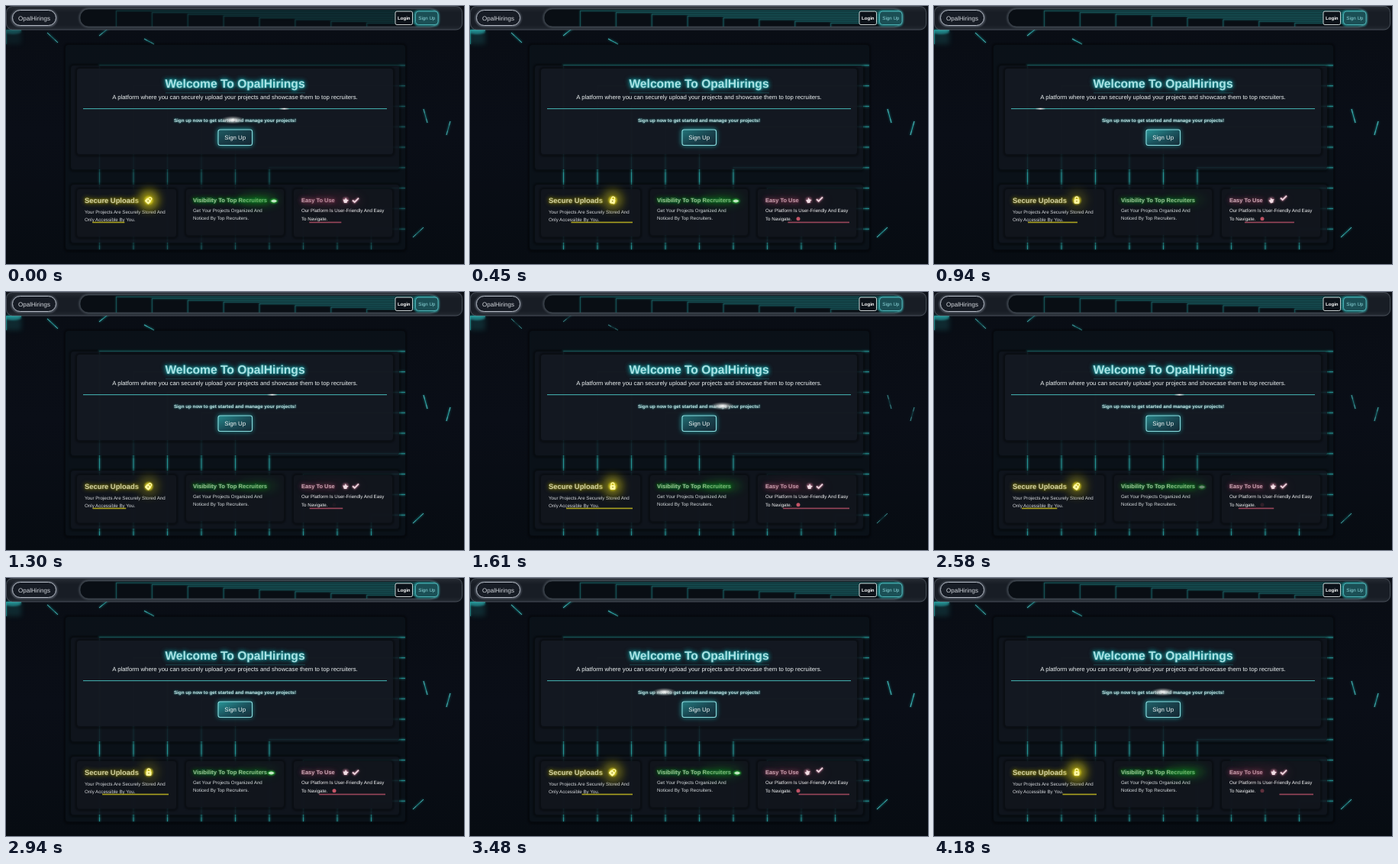
These frames come from a looping animation (600 px wide and 338 px high, 4210 ms). An HTML page:

```html
<!DOCTYPE html>
<html lang="en">
<head>
<meta charset="utf-8">
<title>OpalHirings</title>
<style>
html, body { margin: 0; width: 100%; height: 100%; overflow: hidden; background: #080c13; }
svg { display: block; width: 100vw; height: 100vh; font-family: "Liberation Sans", Arial, sans-serif; text-rendering: geometricPrecision; }
.bold { font-weight: 700; }
</style>
</head>
<body>
<svg id="stage" viewBox="0 0 600 338" preserveAspectRatio="none">
  <defs>
    <linearGradient id="page" x1="0" y1="0" x2="0" y2="1">
      <stop offset="0" stop-color="#090d14"/><stop offset=".5" stop-color="#0a0e17"/><stop offset="1" stop-color="#070c12"/>
    </linearGradient>
    <linearGradient id="navFill" x1="0" y1="0" x2="0" y2="1">
      <stop offset="0" stop-color="#262b33"/><stop offset=".25" stop-color="#181d25"/>
      <stop offset=".8" stop-color="#181d25"/><stop offset="1" stop-color="#242a32"/>
    </linearGradient>
    <linearGradient id="buttonFill" x1="0" y1="0" x2="1" y2="1">
      <stop offset="0" stop-color="#2a9a9c"/><stop offset=".5" stop-color="#1b5660"/><stop offset="1" stop-color="#162d39"/>
    </linearGradient>
    <radialGradient id="flare">
      <stop offset="0" stop-color="#fff"/><stop offset=".3" stop-color="#ddd" stop-opacity=".8"/>
      <stop offset="1" stop-color="#888" stop-opacity="0"/>
    </radialGradient>
    <linearGradient id="beam">
      <stop offset="0" stop-color="#fff" stop-opacity="0"/><stop offset=".5" stop-color="#fff"/>
      <stop offset="1" stop-color="#fff" stop-opacity="0"/>
    </linearGradient>
    <filter id="blurText" x="-5%" y="-20%" width="110%" height="140%"><feGaussianBlur stdDeviation=".4"/></filter>
    <filter id="soft1" x="-50%" y="-100%" width="200%" height="300%"><feGaussianBlur stdDeviation="1.2"/></filter>
    <filter id="soft3" x="-50%" y="-150%" width="200%" height="400%"><feGaussianBlur stdDeviation="3.2"/></filter>
    <filter id="soft6" x="-100%" y="-150%" width="300%" height="400%"><feGaussianBlur stdDeviation="6"/></filter>
    <clipPath id="messageClip"><rect x="220" y="143" width="160" height="13"/></clipPath>
    <clipPath id="ruleClip"><rect x="101" y="132" width="398" height="5"/></clipPath>
    <clipPath id="navClip"><rect x="97" y="4" width="469" height="23" rx="10"/></clipPath>
  </defs>
</svg>
<script>
const NS = "http://www.w3.org/2000/svg";
const LOOP = 4210;
const SHORT = 1327, MEDIUM = 1990, LONG = 2654;
const TEAL = "#26a6a6";
const stage = document.getElementById("stage");

function add(tag, attrs, parent = stage) {
  const el = document.createElementNS(NS, tag);
  set(el, attrs);
  return parent.appendChild(el);
}

function set(el, attrs) {
  for (const key in attrs) el.setAttribute(key, attrs[key]);
}

function group(attrs = {}, parent = stage) {
  return add("g", attrs, parent);
}

function box(x, y, width, height, rx, attrs, parent) {
  return add("rect", { x, y, width, height, rx, ...attrs }, parent);
}

function text(x, y, size, fill, content, attrs = {}, parent = stage) {
  const el = add("text", { x, y, "font-size": size, fill, ...attrs }, parent);
  el.textContent = content;
  return el;
}

function stroke(d, color, width, parent = stage, attrs = {}) {
  return add("path", { d, fill: "none", stroke: color, "stroke-width": width, ...attrs }, parent);
}

function glowStroke(d, parent, width = 0.7) {
  stroke(d, TEAL, 3, parent, { filter: "url(#soft1)", opacity: 0.4 });
  stroke(d, "#2fb5b4", width, parent);
}

// Dark raised panel with a soft shadow around it.
function panel(x, y, w, h, fill, opacity) {
  box(x - 1, y - 1, w + 2, h + 3, 4, { fill: "none", stroke: "#000", "stroke-width": 2, opacity: 0.5, filter: "url(#soft1)" });
  box(x, y, w, h, 4, { fill, "fill-opacity": opacity });
}

// Nested corners, each one tenth further right and down.
function stairs(x, y, w, h, count) {
  let d = "";
  for (let i = 1; i <= count; i++) {
    d += `M${x + w * i / 10} ${y + h}V${y + h * i / 10}H${x + w}`;
  }
  return d;
}

function glowTitle(x, y, size, color, halo, content, anchor = "start") {
  const attrs = { class: "bold", "text-anchor": anchor };
  const glow = group();
  for (const blur of ["soft3", "soft3", "soft1", "soft1"]) {
    text(x, y, size, halo, content, { ...attrs, filter: `url(#${blur})` }, glow);
  }
  text(x, y, size, color, content, { ...attrs, filter: "url(#blurText)" });
  return glow;
}

// Linear interpolation through [time, value] pairs.
function track(t, points) {
  const next = points.findIndex(p => p[0] > t);
  if (next < 0) return points[points.length - 1][1];
  if (next === 0) return points[0][1];
  const [t0, a] = points[next - 1], [t1, b] = points[next];
  return a + (b - a) * (t - t0) / (t1 - t0);
}

// Page and stray sparks, whose ends stay lit while the middle fades
box(0, 0, 600, 338, 0, { fill: "url(#page)" });
const sparkPaths = ["M54 35L68 48", "M181 43L194 50", "M122 39L137 27", "M547 135L552 153", "M582 151L577 169", "M533 303L547 290"];
const sparks = group();
glowStroke(sparkPaths.join(""), sparks, 1);
for (const d of sparkPaths) {
  stroke(d, "#5fc4c4", 0.9, stage, { pathLength: 100, "stroke-dasharray": "30 40", opacity: 0.6 });
}
const corner = group();
box(0, 31, 20, 19, 0, { fill: "#1c6a70", opacity: 0.3, filter: "url(#soft3)" }, corner);
add("ellipse", { cx: 9, cy: 34, rx: 11, ry: 3, fill: "#2bb0b2", opacity: 0.6, filter: "url(#soft1)" }, corner);
glowStroke("M0 50V32H20", corner, 1);

// Navigation bar
box(0, 0, 598, 31, 8, { fill: "#8b98a5", opacity: 0.2, filter: "url(#soft1)" });
box(0.5, 0.5, 597, 30.5, 8, { fill: "url(#navFill)", stroke: "#59616b", "stroke-width": 0.7 });
box(8, 6, 58, 20, 10, { fill: "none", stroke: "#aab4c4", "stroke-width": 2.5, opacity: 0.45, filter: "url(#soft1)" });
box(8.5, 5.5, 57, 20, 10, { fill: "#171c25", stroke: "#c5cbd5", "stroke-width": 0.9 });
text(37, 18.6, 8, "#d5d9df", "OpalHirings", { "text-anchor": "middle" });
box(97, 4, 469, 23, 11, { fill: "none", stroke: "#7d8791", "stroke-width": 3, opacity: 0.4, filter: "url(#soft1)" });
box(97, 4, 469, 23, 11, { fill: "#090e14", stroke: "#3f4851", "stroke-width": 0.7 });
const navStairs = group({ "clip-path": "url(#navClip)" });
const navPath = stairs(97.5, 4, 469, 23, 8);
stroke(navPath, TEAL, 2, navStairs, { filter: "url(#soft1)", opacity: 0.25 });
stroke(navPath, "#279596", 0.6, navStairs, { opacity: 0.75 });
box(510, 7, 22.5, 17.5, 2, { fill: "#0c1219", stroke: "#dfe6e6", "stroke-width": 0.9 });
text(521.3, 18.4, 6.1, "#fff", "Login", { "text-anchor": "middle", class: "bold" });
box(536, 7, 30, 18, 4, { fill: "none", stroke: "#30bcbc", "stroke-width": 3, filter: "url(#soft1)", opacity: 0.65 });
box(536.5, 7, 29.5, 17.5, 4, { fill: "#1b4f55", stroke: "#58c5c8", "stroke-width": 0.8 });
text(551.3, 18.4, 6.2, "#8fdadd", "Sign Up", { "text-anchor": "middle" });

// Main container
panel(78, 51, 445, 268, "#0b1119", 0.95);
const mainStairs = group();
glowStroke(stairs(78, 51, 445, 268, 9), mainStairs);
panel(85, 78, 430, 136, "#10151d", 0.84);
panel(93, 82, 414, 112, "#151922", 0.9);
panel(85, 234, 430, 76, "#10151d", 0.84);

// Hero
const heroGlow = glowTitle(300, 106.5, 15.6, "#a9e2e4", "#1f9196", "Welcome To OpalHirings", "middle");
stroke("M209 113.8H392", "#27868a", 0.7, stage, { opacity: 0.6 });
text(300, 121.9, 7.8, "#eef3f4", "A platform where you can securely upload your projects and showcase them to top recruiters.", { "text-anchor": "middle" });
stroke("M101 134.6H499", "#45b5b4", 1);
const rule = group({ "clip-path": "url(#ruleClip)" });
const beam = box(0, 133.8, 14, 1.6, 0, { fill: "url(#beam)" }, rule);
const message = "Sign up now to get started and manage your projects!";
text(300, 151.8, 6.25, "#2fa3a4", message, { "text-anchor": "middle", class: "bold", filter: "url(#soft1)" });
text(300, 151.8, 6.25, "#c5dedf", message, { "text-anchor": "middle", class: "bold" });
const messageShine = group({ "clip-path": "url(#messageClip)" });
const flare = add("ellipse", { cy: 149.3, rx: 16, ry: 5.5, fill: "url(#flare)" }, messageShine);
const buttonGlow = box(277, 161, 46, 22, 4, { fill: "#22adb0", filter: "url(#soft3)" });
box(278, 162, 44.5, 20.5, 2.5, { fill: "#15222e" });
const buttonFill = box(278, 162, 44.5, 20.5, 2.5, { fill: "url(#buttonFill)" });
box(278, 162, 44.5, 20.5, 2.5, { fill: "none", stroke: "#8adcdf", "stroke-width": 1.1 });
text(300.2, 175.2, 7.85, "#f4f8f8", "Sign Up", { "text-anchor": "middle" });

// Feature cards
function card({ x, y, w, h, size, color, halo, title, titleY, textX, lines, ink }) {
  panel(x, y, w, h, "#11161d", 0.95);
  const glow = glowTitle(textX, titleY, size, color, halo, title);
  lines.forEach(([lineY, line]) => text(textX, lineY, 6.2, ink, line));
  return glow;
}

const yellowTitle = card({
  x: 93, y: 240, w: 130, h: 62, textX: 103, titleY: 258, size: 9.4, color: "#d0cfa0", halo: "#746f18",
  title: "Secure Uploads", ink: "#d5d8dc",
  lines: [[272.3, "Your Projects Are Securely Stored And"], [281.8, "Only Accessible By You."]]
});
const greenTitle = card({
  x: 236, y: 240, w: 128, h: 60, textX: 245, titleY: 256.7, size: 7.6, color: "#95bd97", halo: "#1c7a24",
  title: "Visibility To Top Recruiters", ink: "#d5dadd",
  lines: [[270.2, "Get Your Projects Organized And"], [279.5, "Noticed By Top Recruiters."]]
});
const pinkTitle = card({
  x: 377, y: 240, w: 129, h: 62, textX: 387, titleY: 256.7, size: 7.45, color: "#cfb0bc", halo: "#6b3549",
  title: "Easy To Use", ink: "#f6f7f8",
  lines: [[270.2, "Our Platform Is User-Friendly And Easy"], [281, "To Navigate."]]
});

const yellowHalo = add("circle", { cx: 187, cy: 254, r: 13, fill: "#b0a610", filter: "url(#soft6)" });
const greenHalo = add("ellipse", { cx: 330, cy: 254, rx: 26, ry: 7, fill: "#138f20", filter: "url(#soft6)" });
const pinkHalo = add("ellipse", { cx: 426, cy: 255, rx: 40, ry: 9, fill: "#6b2a40", filter: "url(#soft6)" });

add("circle", { cx: 187, cy: 254.5, r: 5.5, fill: "#d9cd20", filter: "url(#soft1)", opacity: 0.9 });
const lock = group();
box(-3.5, -1.5, 7, 6, 1.5, { fill: "#fff8a2" }, lock);
stroke("M-2 -1V-2.5A2 2 0 0 1 2 -2.5V-1", "#fff8a2", 1.3, lock);
add("circle", { cx: 0, cy: 1.2, r: 0.8, fill: "#8d841a" }, lock);

const eye = group();
add("ellipse", { rx: 5, ry: 3, fill: "#25b834", filter: "url(#soft1)" }, eye);
add("path", { d: "M-4 0Q0 -4 4 0Q0 4 -4 0Z", fill: "#c3e8c5" }, eye);

const hand = group();
add("circle", { r: 4, fill: "#b8738c", filter: "url(#soft1)", opacity: 0.7 }, hand);
add("path", { d: "M-3.5 -1L-1 -1L0 -3.5L1.5 -1L4 0L2 1.5L1.5 3.5H-2Z", fill: "#f0dce3" }, hand);
const check = group();
stroke("M-4 0L-1.3 2.5L4 -2.8", "#b0708a", 3, check, { filter: "url(#soft1)" });
stroke("M-4 0L-1.3 2.5L4 -2.8", "#ead5dc", 1.8, check);

function underline(color) {
  return [
    add("line", { y1: 283.4, y2: 283.4, stroke: color, "stroke-width": 2.5, opacity: 0.3 }),
    add("line", { y1: 283.4, y2: 283.4, stroke: color, "stroke-width": 0.9 })
  ];
}
const underlines = [[103, underline("#c4b922")], [387, underline("#b04f66")]];
const dot = add("circle", { cx: 430, cy: 278.8, r: 2.5, fill: "#d0596c" });

// Repeating every SHORT
const lineStart = [[0, 10], [199, 66], [284, 23], [826, 44], [883, 22], [940, 20], [SHORT, 10]];
const lineEnd = [[0, 52], [199, 110], [883, 110], [940, 85], [SHORT, 52]];
const dotAlpha = [[0, 0], [199, 0.4], [284, 0.95], [940, 0.9], [SHORT, 0]];
const checkLift = [[0, 0], [290, 0], [660, 1], [1000, 1], [SHORT, 0]];
const lockTurn = [[0, 45], [199, 0], [290, 0], [826, 45], [940, 0], [SHORT, 45]];
// Repeating every MEDIUM
const flarePath = [[0, 297], [210, 300], [340, 200], [1400, 200], [1490, 254], [1610, 330], [1700, 400], [1850, 400], [MEDIUM, 297]];
// Repeating every LONG
const sparkAlpha = [[0, 0.7], [500, 0.95], [1120, 0.95], [1526, 0.85], [1610, 0.3], [2210, 0.3], [LONG, 0.7]];
const eyeAlpha = [[0, 1], [826, 1], [930, 0], [2500, 0], [LONG, 1]];
const eyeX = [[0, 351], [286, 347.5], [826, 350], [LONG, 351]];

function render(t) {
  const short = t % SHORT, medium = t % MEDIUM, long = t % LONG;
  const lit = Math.min(1, 0.55 + t / 600);
  set(mainStairs, { opacity: lit });
  set(navStairs, { opacity: lit });
  set(corner, { opacity: lit });
  set(sparks, { opacity: track(long, sparkAlpha) });

  set(flare, { cx: track(medium, flarePath) });
  set(beam, { x: (661 + 772 * t / SHORT) % 772 - 304 });

  const halo = 0.6 + 0.35 * Math.cos(2 * Math.PI * t / MEDIUM);
  set(buttonFill, { opacity: 1.15 - 0.7 * halo });
  set(buttonGlow, { opacity: 0.6 + 0.3 * halo });
  set(heroGlow, { opacity: 0.85 + 0.15 * halo });
  set(yellowHalo, { opacity: halo * 0.9 });
  set(yellowTitle, { opacity: 0.65 + 0.35 * halo });
  set(greenHalo, { opacity: halo * 0.5 });
  set(greenTitle, { opacity: 0.7 + 0.3 * halo });
  set(pinkHalo, { opacity: halo * 0.3 });
  set(pinkTitle, { opacity: 0.7 + 0.3 * halo });

  const lift = track(short, checkLift);
  set(lock, { transform: `translate(187 254.5) rotate(${track(short, lockTurn)})` });
  set(eye, { transform: `translate(${track(long, eyeX)} 255.5)`, opacity: track(long, eyeAlpha) });
  set(hand, { transform: `translate(${445 - 3 * lift} 254.5) rotate(${-20 * lift})` });
  set(check, { transform: `translate(458 ${254.5 - 3 * lift})` });

  for (const [x, lines] of underlines) {
    for (const line of lines) set(line, { x1: x + track(short, lineStart), x2: x + track(short, lineEnd) });
  }
  set(dot, { opacity: track(short, dotAlpha) });
}

const start = performance.now();
function tick(now) {
  render(Math.max(0, now - start) % LOOP);
  requestAnimationFrame(tick);
}
render(0);
requestAnimationFrame(tick);
</script>
</body>
</html>
```
